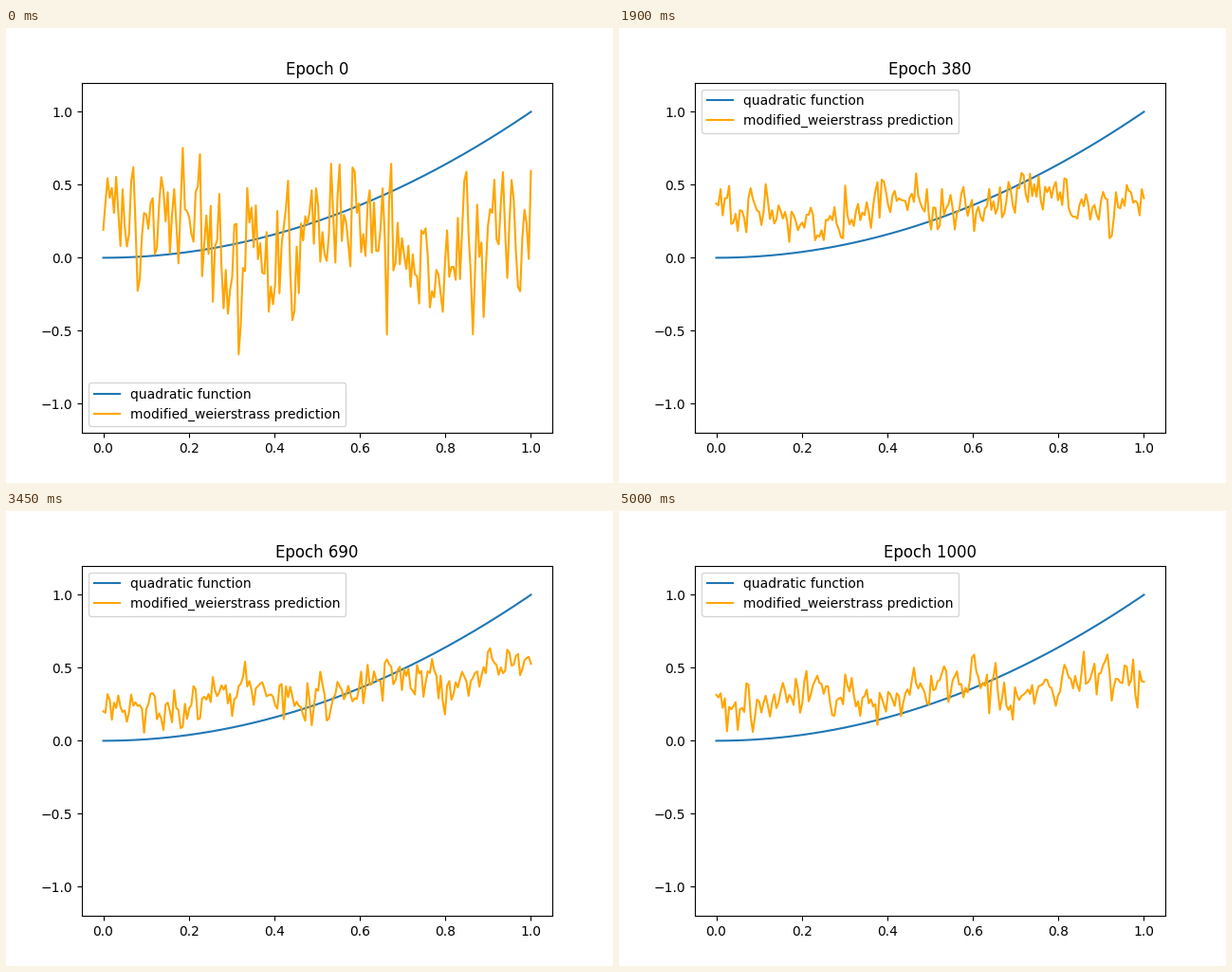
These frames come from a looping animation (640x480 px, 5050 ms). A matplotlib script:

```python
import numpy as np
import matplotlib.pyplot as plt
from matplotlib.animation import FuncAnimation

FRAMES = 101
STEP_MS = 50
EPOCHS_PER_FRAME = 10

x = np.linspace(0, 1, 200)


def bell(value, center, width):
    return np.exp(-((value - center) / width) ** 2)


def trend(epoch, settle, surge):
    """Tilted mean level with a slow wave that drifts to the right."""
    level = 0.34 - 0.21 * settle
    slope = 0.1 + 0.55 * bell(epoch, 560, 130) - 0.2 * settle
    sway = 0.06 + 0.15 * settle + 0.07 * surge
    period = 0.33 + 0.11 * settle
    crest = 0.1 + 0.0008 * epoch
    wave = np.cos(2 * np.pi * (x - crest) / period)
    return level + slope * (x - 0.5) + sway * wave


def noise(frame):
    """Jagged, slightly correlated noise that depends on the frame only."""
    rng = np.random.default_rng(700 + frame)
    white = rng.normal(size=x.size + 1)
    return np.clip(0.96 * white[1:] + 0.28 * white[:-1], -2.4, 2.4)


def prediction(frame):
    epoch = frame * EPOCHS_PER_FRAME
    settle = np.exp(-epoch / 40)     # wild start dying down
    surge = bell(epoch, 490, 90)     # restless phase midway
    rough = 0.08 + 0.17 * settle + 0.05 * surge
    return trend(epoch, settle, surge) + rough * noise(frame)


fig, ax = plt.subplots(figsize=(6.4, 4.8), dpi=100)
ax.plot(x, x**2, label="quadratic function")
pred_line, = ax.plot(x, prediction(0), color="orange",
                     label="modified_weierstrass prediction")
ax.set_ylim(-1.2, 1.2)
title = ax.set_title("Epoch 0")
legend = ax.legend(loc="lower left")


def update(frame):
    pred_line.set_ydata(prediction(frame))
    title.set_text(f"Epoch {frame * EPOCHS_PER_FRAME}")
    # The legend moves up once the early spikes have died down
    legend.set_loc("lower left" if frame < 3 else "upper left")
    return pred_line, title, legend


anim = FuncAnimation(fig, update, frames=FRAMES, interval=STEP_MS,
                     repeat=True, repeat_delay=0, blit=False)
plt.show()
```
